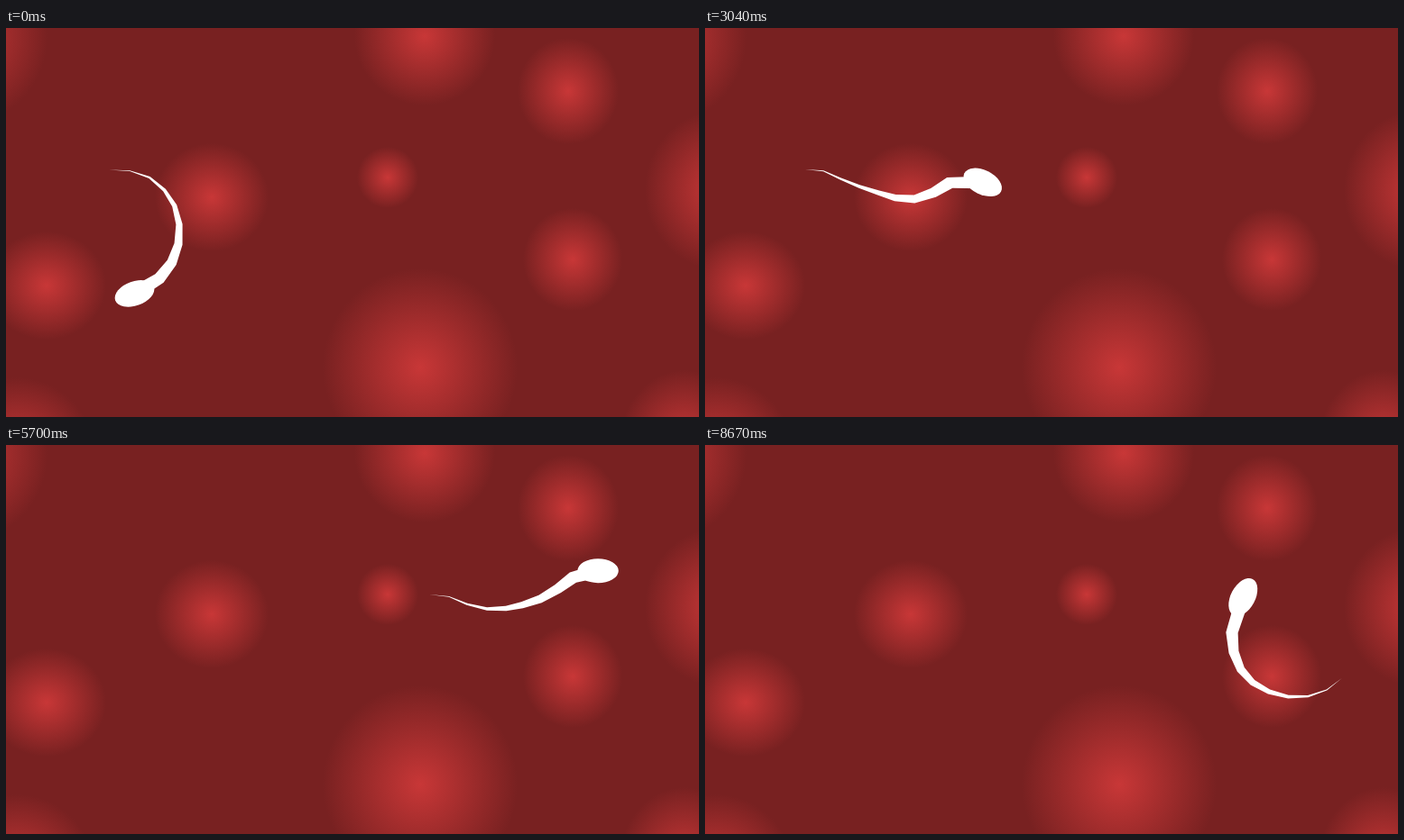
Recreate the animation shown at these times as an HTML page with a canvas. Size 768 by 432 pixels, loop 8.69 s.

```html
<!DOCTYPE html>
<html>
<head>
<meta charset="utf-8">
<style>
  html, body { margin: 0; height: 100%; overflow: hidden; background: #782121; }
  canvas { display: block; }
</style>
</head>
<body>
<canvas id="stage" width="768" height="432"></canvas>
<script>
const ctx = document.getElementById('stage').getContext('2d');
const LOOP = 8690;
const TAIL = 9;          // joints in the tail
const STEP = 3;          // joints between two points of the route
const JOINT_GAP = 0.85;  // how far behind the head a joint is laid down
const TENSION = 0.6;

// Soft cells: cx, cy, rx, ry
const cells = [
  [464, 9, 78, 77], [623, 70, 56, 59], [423, 166, 34, 34], [228, 188, 63, 60],
  [45, 286, 66, 60], [459, 377, 108, 110], [628, 257, 55, 57], [-45, 10, 91, 96],
  [12, 474, 86, 86], [790, 180, 82, 88], [752, 462, 72, 82]
];

// The route the head swims along; the tail stays on it
const route = [
  [97, 157], [159, 166], [192, 218], [170, 278], [107, 298], [58, 257], [58, 195],
  [111, 157], [171, 176], [232, 190], [292, 167], [351, 197], [412, 199], [469, 166],
  [533, 182], [592, 171], [648, 140], [707, 161], [723, 221], [689, 272], [625, 274],
  [586, 230], [599, 164], [655, 110]
];

// Time in ms, distance along the route in joints
const pace = [
  [0, 9.4], [800, 16], [1750, 22.05], [3520, 32.6], [6210, 50.8], [LOOP, 64.9]
];

const point = i => route[Math.max(0, Math.min(route.length - 1, i))];

function distanceAt(t) {
  const i = pace.findIndex(p => p[0] > t);
  const [t0, d0] = pace[i - 1], [t1, d1] = pace[i];
  return d0 + (d1 - d0) * (t - t0) / (t1 - t0);
}

// Cardinal spline: position and heading at a distance along the route
function poseAt(d) {
  const s = (d + 1) / STEP, i = Math.floor(s), u = s - i;
  const pos = [], dir = [];
  for (const k of [0, 1]) {
    const [a, b, c, e] = [-1, 0, 1, 2].map(n => point(i + n)[k]);
    const m = (c - a) * TENSION, n = (e - b) * TENSION;
    const q = 3 * (c - b) - 2 * m - n, r = 2 * (b - c) + m + n;
    pos[k] = b + u * (m + u * (q + u * r));
    dir[k] = m + u * (2 * q + 3 * u * r);
  }
  return { x: pos[0], y: pos[1], angle: Math.atan2(dir[1], dir[0]) };
}

function drawCells() {
  ctx.fillStyle = '#782121';
  ctx.fillRect(0, 0, 768, 432);
  const glow = ctx.createRadialGradient(0, 0, 0, 0, 0, 1);
  glow.addColorStop(0, 'rgba(200,55,55,1)');
  glow.addColorStop(1, 'rgba(200,55,55,0)');
  ctx.fillStyle = glow;
  for (const [x, y, rx, ry] of cells) {
    ctx.save();
    ctx.translate(x, y);
    ctx.scale(rx, ry);
    ctx.fillRect(-1, -1, 2, 2);
    ctx.restore();
  }
}

function drawSwimmer(d) {
  const head = poseAt(d);
  const first = Math.floor(d - JOINT_GAP) - TAIL + 1;
  const spine = Array.from({ length: TAIL }, (_, i) => poseAt(first + i)).concat(head);
  const edge = side => spine.map(({ x, y, angle }, i) => {
    const w = side * 7.75 * (i / TAIL) ** 1.3;
    return [x - Math.sin(angle) * w, y + Math.cos(angle) * w];
  });

  ctx.fillStyle = '#fff';
  ctx.beginPath();
  for (const p of [...edge(1), ...edge(-1).reverse()]) ctx.lineTo(...p);
  ctx.fill();
  ctx.beginPath();
  ctx.ellipse(head.x, head.y, 22.7, 13.5, head.angle, 0, 2 * Math.PI);
  ctx.fill();
}

const start = performance.now();
function draw() {
  drawCells();
  drawSwimmer(distanceAt((performance.now() - start) % LOOP));
  requestAnimationFrame(draw);
}
draw();
</script>
</body>
</html>
```
